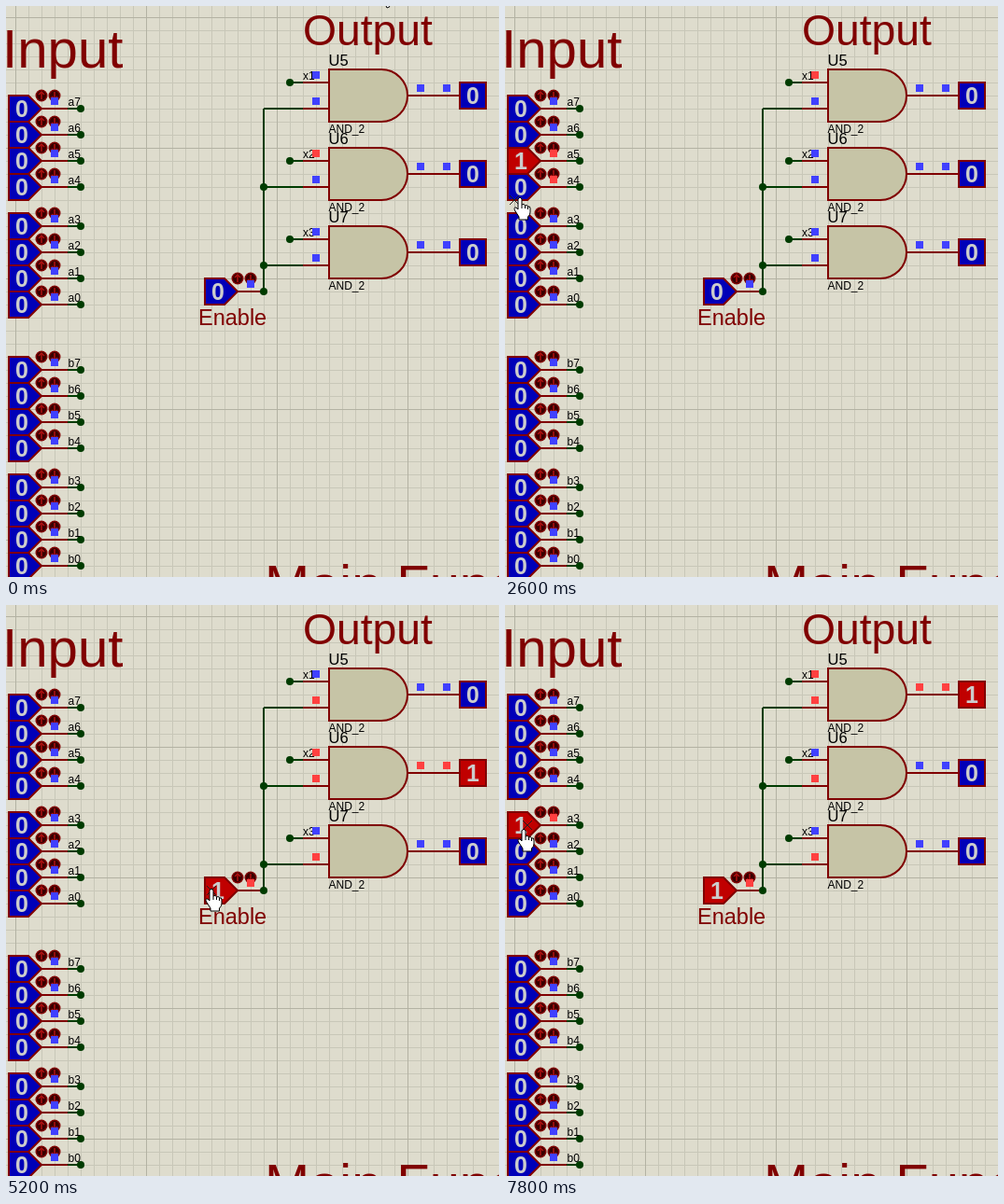
These frames come from a looping animation (528 px wide and 612 px high, 8000 ms). An HTML page with a canvas:

```html
<!DOCTYPE html>
<html lang="en">
<head>
<meta charset="utf-8">
<title>Comparator simulation</title>
<style>
  html, body { margin: 0; width: 100%; height: 100%; overflow: hidden; background: #dedccd; }
  canvas { display: block; }
</style>
</head>
<body>
<canvas id="stage" width="528" height="612"></canvas>
<script>
const ctx = document.getElementById('stage').getContext('2d');
const LOOP = 8000, STEP = 200, GRID = 14;
const MAROON = '#800000', WIRE = '#003c00', BODY = '#c6c4a6';
const HIGH = '#c00000', LOW = '#0000b8';

// Time spans in which each switch is on
const switches = {
  a4: [1600, 2600],
  a5: [2200, 3000],
  a3: [7400, 8000],
  enable: [5000, 8000]
};

// Pointer path: time, x, y
const path = [
  [0, 401, -18], [400, 401, -18], [1200, 24, 219], [1400, 18, 200], [1600, 18, 174],
  [1800, 18, 174], [2200, 17, 160], [2400, 16, 196], [2600, 16, 205], [3000, 17, 166],
  [3200, 20, 176], [3600, 44, 336], [3800, 100, 391], [4200, 415, 192], [4400, 330, 250],
  [4600, 220, 302], [5200, 220, 304], [5600, 440, 210], [5800, 473, 175], [6400, 473, 175],
  [7200, 21, 263], [7400, 20, 242], [7600, 20, 240], [8000, 20, 240]
];

// Terminals from top to bottom: a7..a0, then b7..b0
const inputs = [];
['a', 'b'].forEach((bus, b) => {
  for (let i = 0; i < 8; i++) {
    inputs.push({ name: bus + (7 - i), x: 10, y: 110 + b * 280 + i * 28 + (i > 3 ? 14 : 0) });
  }
});
const enableInput = { name: 'enable', x: 220, y: 306 };
const terminals = [...inputs, enableInput];

const handShape = new Path2D('M-2 11V2Q0-1.5 2 2V8Q4.5 6 5.5 9Q8 7.5 8.5 10Q11 9 11 12V16' +
  'Q11 19 8.5 21V24H-1V21L-5.5 14Q-7 10.5-4 11L-2 13Z');
const arrowShape = new Path2D('M0 0V17L4 13.5L7 20L9.8 18.8L7 12.5H12Z');

const isOn = (name, t) => {
  const span = switches[name];
  return Boolean(span) && t >= span[0] && t < span[1];
};

function text(str, x, y, size, color = '#000', weight = 'normal', align = 'left') {
  ctx.font = `${weight} ${size}px "Liberation Sans", Arial, sans-serif`;
  ctx.fillStyle = color;
  ctx.textAlign = align;
  ctx.fillText(str, x, y);
}

function line(color, width, ...points) {
  ctx.strokeStyle = color;
  ctx.lineWidth = width;
  ctx.beginPath();
  for (let i = 0; i < points.length; i += 2) ctx.lineTo(points[i], points[i + 1]);
  ctx.stroke();
}

function dot(x, y, r = 4, color = WIRE) {
  ctx.fillStyle = color;
  ctx.beginPath();
  ctx.arc(x, y, r, 0, Math.PI * 2);
  ctx.fill();
}

function pin(x, y, on) {
  ctx.fillStyle = on ? '#ff4040' : '#4040ff';
  ctx.fillRect(x - 4, y - 5, 8, 8);
}

function digit(x, y, on) {
  text(on ? '1' : '0', x, y + 9, 25, '#cccccc', 'bold', 'center');
}

function polygon(fill, points) {
  ctx.fillStyle = fill;
  ctx.strokeStyle = MAROON;
  ctx.lineWidth = 2;
  ctx.beginPath();
  points.forEach(([x, y]) => ctx.lineTo(x, y));
  ctx.closePath();
  ctx.fill();
  ctx.stroke();
}

function drawGrid() {
  ctx.fillStyle = '#dedccd';
  ctx.fillRect(0, 0, 528, 612);
  for (const major of [false, true]) {
    const gap = major ? GRID * 10 : GRID;
    ctx.fillStyle = major ? '#b3b2a3' : '#c8c7b8';
    for (let x = 10; x < 528; x += gap) ctx.fillRect(x, 0, 1, 612);
    for (let y = 12; y < 612; y += gap) ctx.fillRect(0, y, 528, 1);
  }
}

function actuator(x, y, dir) {
  dot(x, y, 6.5, MAROON);
  dot(x, y, 5, '#380000');
  line('#b01010', 1.5, x, y - 4, x, y + 4);
  line('#b01010', 1.5, x - 3, y - dir, x, y - dir * 4, x + 3, y - dir);
}

function drawTerminal({ name, x, y }, t) {
  const on = isOn(name, t);
  line(MAROON, 2, x + 28, y, x + 56, y);
  polygon(on ? HIGH : LOW, [[x - 7, y - 14], [x + 14, y - 14], [x + 28, y],
                            [x + 14, y + 14], [x - 7, y + 14]]);
  digit(x + 7, y, on);
  actuator(x + 28, y - 14, 1);
  actuator(x + 42, y - 14, -1);
  pin(x + 42, y - 7, isOn(name, t - STEP));
}

function drawGate(index, on, enabled) {
  const y = 96 + index * 84, out = on && enabled;
  line(WIRE, 2, 304, y - 14, 318, y - 14);
  line(WIRE, 2, 276, y + 14, 318, y + 14);
  line(MAROON, 2, 318, y - 14, 346, y - 14);
  line(MAROON, 2, 318, y + 14, 346, y + 14);
  line(MAROON, 2, 430, y, 486, y);
  dot(304, y - 14);

  ctx.fillStyle = BODY;
  ctx.beginPath();
  ctx.moveTo(346, y - 28);
  ctx.lineTo(402, y - 28);
  ctx.arc(402, y, 28, -Math.PI / 2, Math.PI / 2);
  ctx.lineTo(346, y + 28);
  ctx.closePath();
  ctx.fill();
  ctx.stroke();

  text('U' + (index + 5), 345.5, y - 32, 16.5);
  text('AND_2', 345.5, y + 40, 12);
  text('x' + (index + 1), 318, y - 17, 12);
  pin(332, y - 21, on);
  pin(332, y + 7, enabled);
  pin(444, y - 7, out);
  pin(472, y - 7, out);

  polygon(out ? HIGH : LOW, [[486, y - 14], [514, y - 14], [514, y + 14], [486, y + 14]]);
  digit(500, y, out);
}

function pointerAt(t) {
  const next = path.findIndex(key => key[0] > t);
  const [t0, x0, y0] = path[next - 1], [t1, x1, y1] = path[next];
  const k = (t - t0) / (t1 - t0);
  return [x0 + (x1 - x0) * k, y0 + (y1 - y0) * k];
}

function drawPointer(t) {
  const [x, y] = pointerAt(t).map(Math.round);

  // The cross snaps to the grid beneath the pointer
  const cx = Math.round((x - 10) / GRID) * GRID + 10;
  const cy = Math.round((y - 15) / GRID) * GRID + 12;
  line('#202020', 1, cx - 5, cy - 5, cx + 5, cy + 5);
  line('#202020', 1, cx - 5, cy + 5, cx + 5, cy - 5);

  const hovering = terminals.some(p => x > p.x - 8 && x < p.x + 28 && Math.abs(y - p.y) <= 14);
  const shape = hovering ? handShape : arrowShape;
  ctx.save();
  ctx.translate(x, y);
  ctx.fillStyle = '#fff';
  ctx.strokeStyle = '#000';
  ctx.lineWidth = 1;
  ctx.fill(shape);
  ctx.stroke(shape);
  if (hovering) {
    line('#000', 1, 2, 8, 2, 12);
    line('#000', 1, 5.5, 9, 5.5, 12);
    line('#000', 1, 8.5, 10, 8.5, 13);
  }
  ctx.restore();
}

function draw(t) {
  drawGrid();
  text('Input', -4, 66, 58.2, MAROON);
  text('Output', 318, 41.5, 46.3, MAROON);
  text('Enable', 206, 342, 23.5, MAROON);
  text('Main Function', 277, 640, 57.8, MAROON);

  line(WIRE, 2, 276, 110, 276, 306);
  for (const y of [194, 278]) dot(276, y);
  for (const input of inputs) {
    line(WIRE, 2, 66, input.y, 80, input.y);
    dot(80, input.y);
    text(input.name, 66.5, input.y - 3, 12);
  }
  terminals.forEach(terminal => drawTerminal(terminal, t));
  dot(276, 306);

  // Signals reach the gates one step after a switch flips
  const settled = t - STEP;
  const greater = inputs.some(({ name }) => isOn(name, settled));
  const enabled = isOn('enable', settled);
  [greater, !greater, false].forEach((on, i) => drawGate(i, on, enabled));
  drawPointer(t);
}

const start = performance.now();
function frame() {
  const t = (performance.now() - start) % LOOP;
  draw(Math.floor(t / STEP) * STEP);
  requestAnimationFrame(frame);
}
frame();
</script>
</body>
</html>
```
